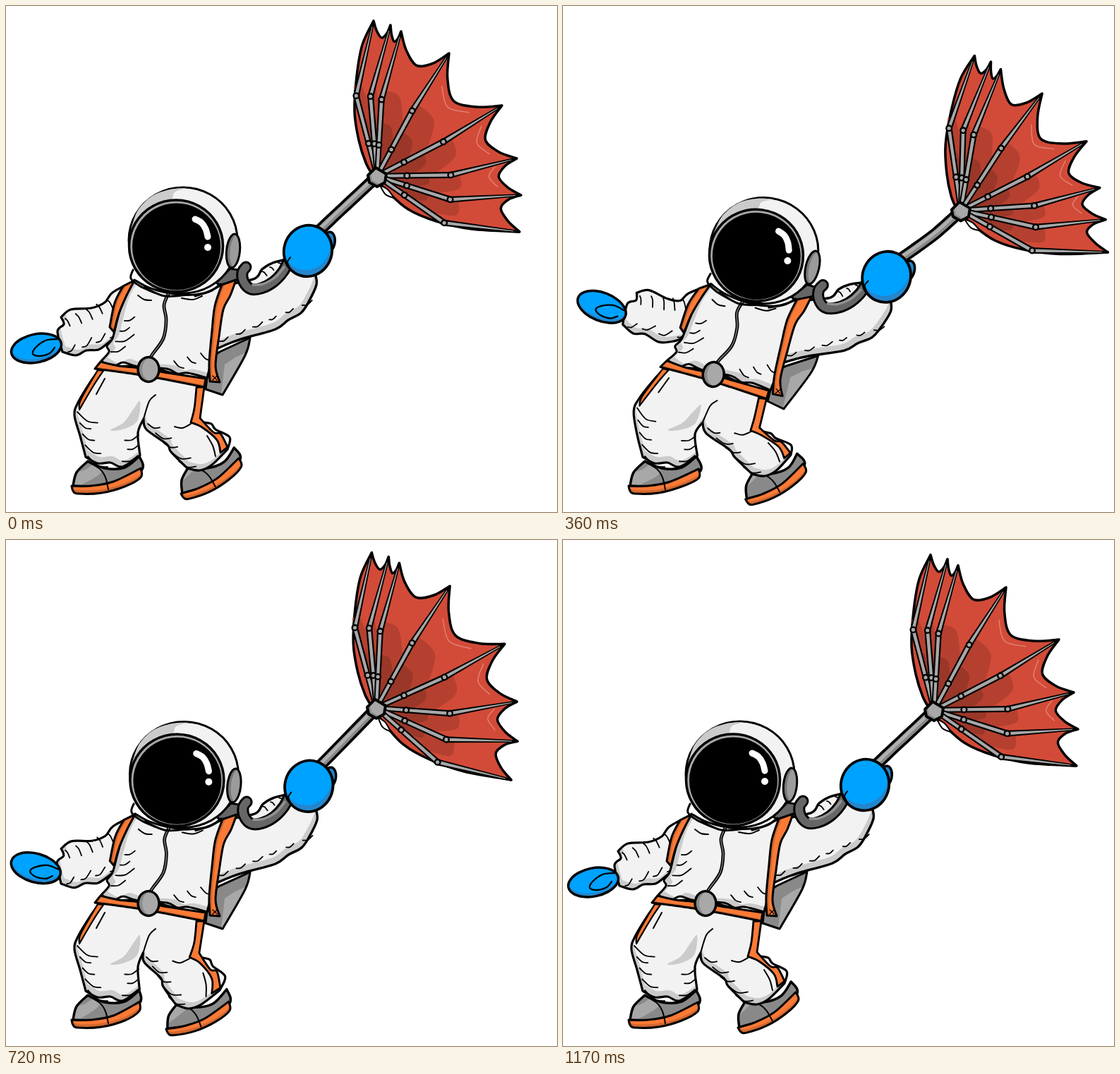
Write an HTML page with a canvas that moves like this. It is 781 by 717 pixels and loops after 1200 ms.

```html
<!DOCTYPE html>
<html lang="en">
<head>
<meta charset="utf-8">
<title>Astronaut with umbrella</title>
<style>
html, body { margin: 0; width: 781px; height: 717px; overflow: hidden; background: #fff; }
canvas { display: block; }
</style>
</head>
<body>
<canvas id="stage" width="781" height="717"></canvas>
<script>
const ctx = document.getElementById('stage').getContext('2d');
const WHITE = '#f2f2f2', PALE = '#cbcbcb', ORANGE = '#fb7a36', RUST = '#d2682f', BLUE = '#00a2ff', DEEP = '#2585cc';
const STEEL = '#a8a8a8', GREY = '#898989', DARK = '#666', RED = '#d24b38';
const HUB = [526, 241], HIP = [152, 607], WAIST = [202, 515], LEFT_FOOT = [143, 668];
const SHOULDER = [160, 432], WRIST = [78, 478], ANKLE = [290, 666];
const LOOP = 1170;
let pose;

const clamp = v => Math.min(1, Math.max(0, v));
const lerp = (a, b, t) => a + (b - a) * t;
const mix = (p, q, t) => [lerp(p[0], q[0], t), lerp(p[1], q[1], t)];
const add = (p, q, w = 1) => [p[0] + q[0] * w, p[1] + q[1] * w];
const ramp = (v, a, b) => { const t = clamp((v - a) / (b - a)); return t * t * (3 - 2 * t); };
const rise = (t, from, peak, to) => ramp(t, from, peak) * (1 - ramp(t, peak, to));
const random = i => { const v = Math.sin(i * 12.9898) * 43758.5453; return v - Math.floor(v); };
const turn = ([x, y], [cx, cy], a) => {
  const c = Math.cos(a), s = Math.sin(a);
  return [cx + (x - cx) * c - (y - cy) * s, cy + (x - cx) * s + (y - cy) * c];
};

// One gust: the figure is dragged along, staggers back and settles.
function poseAt(t) {
  const gust = rise(t, 0, 400, 600), pull = rise(t, 0, 400, 720), recoil = rise(t, 600, 900, LOOP);
  const settle = 1 - ramp(t, 850, LOOP), hold = ramp(t, 0, 360) * settle, stagger = ramp(t, 450, 690) * settle;
  return {
    lean: .13 * gust,
    bend: .05 * rise(t, 430, 600, 760),
    arm: .34 * rise(t, 0, 400, 800),
    wrist: .12 * hold + .32 * stagger,
    foot: [11 * gust - 18 * stagger, 8 * hold],
    footTurn: .14 * stagger,
    hub: [39 * pull - 3 * recoil, 50 * pull - 9 * recoil],
    upper: .157 * rise(t, 0, 560, 760) - .105 * rise(t, 640, 900, LOOP),
    lower: .122 * rise(t, 560, 740, LOOP) - .096 * rise(t, 0, 380, 620)
  };
}

// Each part is described at rest and bent into the current pose.
const torso = p => turn(turn(p, WAIST, pose.bend * ramp(p[1], 520, 400)), HIP, pose.lean * ramp(p[1], 640, 560));
const sleeve = p => torso(turn(p, SHOULDER, pose.arm * ramp(p[0], 165, 110)));
const mitten = p => torso(turn(turn(p, WRIST, pose.wrist), SHOULDER, pose.arm));
const legs = p => {
  const moved = add(add(turn(p, ANKLE, pose.footTurn), pose.foot), p, -1);
  return add(torso(p), moved, ramp(p[1], 560, 650) * ramp(p[0], 188, 202));
};
const rightFoot = p => legs(mix(ANKLE, add(turn(p, LEFT_FOOT, -.3), add(ANKLE, LEFT_FOOT, -1)), .95));
const hub = p => add(p, pose.hub);
const shaft = p => mix(torso(p), hub(p), ramp(p[0], 425, 540));
const canopy = p => {
  const angle = Math.atan2(p[1] - HUB[1], p[0] - HUB[0]);
  return hub(turn(p, HUB, lerp(pose.upper, pose.lower, clamp((angle + 1.31) / 1.66))));
};

// "x,y" points joined by a smooth curve; "!" marks a corner
const points = s => Array.isArray(s) ? s : s.trim().split(/\s+/).flatMap(w => {
  const p = w.replace('!', '').split(',').map(Number);
  return w.endsWith('!') ? [p, p] : [p];
});
const ring = (cx, cy, rx, ry, tilt = 0) => Array.from({ length: 12 }, (_, i) => {
  const a = i * Math.PI / 6;
  return turn([cx + rx * Math.cos(a), cy + ry * Math.sin(a)], [cx, cy], tilt);
});

function trace(shape, warp, closed) {
  const q = points(shape).map(warp), n = q.length;
  const at = i => closed ? q[(i + n) % n] : q[Math.min(n - 1, Math.max(0, i))];
  ctx.beginPath();
  ctx.moveTo(...q[0]);
  for (let i = 0; i < (closed ? n : n - 1); i++) {
    const [a, b, c, d] = [at(i - 1), at(i), at(i + 1), at(i + 2)];
    if (b[0] === c[0] && b[1] === c[1]) continue;
    ctx.bezierCurveTo(b[0] + (c[0] - a[0]) / 6, b[1] + (c[1] - a[1]) / 6,
      c[0] - (d[0] - b[0]) / 6, c[1] - (d[1] - b[1]) / 6, c[0], c[1]);
  }
  if (closed) ctx.closePath();
}

function stroke(color, width) {
  ctx.strokeStyle = color;
  ctx.lineWidth = width;
  ctx.stroke();
}

// The shade is what the same shape, moved towards the light, leaves uncovered.
function part(warp, shape, fill, width = 3, shade, light) {
  trace(shape, warp, true);
  ctx.fillStyle = shade || fill;
  ctx.fill();
  if (shade) {
    ctx.save();
    ctx.clip();
    ctx.translate(...light);
    trace(shape, warp, true);
    ctx.fillStyle = fill;
    ctx.fill();
    ctx.restore();
    trace(shape, warp, true);
  }
  if (width) stroke('#000', width);
}

function lines(warp, list, width = 2, color = '#000') {
  for (const s of Array.isArray(list) ? [list] : list.split(';')) {
    trace(s, warp, false);
    stroke(color, width);
  }
}

function tube(warp, s, outer, inner, color) {
  lines(warp, s, outer);
  lines(warp, s, inner, color);
}

// Creases in the cloth: curved strokes of varied length, spread between two points
function folds(warp, from, to, count, reach, sag) {
  for (let i = 0; i < count; i++) {
    const start = mix(from, to, i / (count - 1)), size = .55 + .6 * random(i + from[0]);
    const end = add(start, reach, size), middle = add(mix(start, end, .5), [0, sag * size]);
    lines(warp, [start, middle, end], 1.8);
  }
}

function taper(a, b, wa, wb, color) {
  const len = Math.hypot(b[0] - a[0], b[1] - a[1]);
  const n = [(a[1] - b[1]) / len / 2, (b[0] - a[0]) / len / 2];
  ctx.beginPath();
  for (const p of [add(a, n, wa), add(b, n, wb), add(b, n, -wb), add(a, n, -wa)]) ctx.lineTo(...p);
  ctx.fillStyle = color;
  ctx.fill();
}

function dot(p, r, color) {
  ctx.beginPath();
  ctx.arc(...p, r, 0, 7);
  ctx.fillStyle = color;
  ctx.fill();
}

const TIPS = points('521,21 545,27 560,36 628,67 703,141 724,216 730,268 728,320');
// ribs bow outwards more the further they are from the middle
const JOINTS = TIPS.map((tip, i) => {
  const [x, y] = add(tip, HUB, -1), bow = lerp(-27, 27, i / 7) / Math.hypot(x, y);
  return add(mix(HUB, tip, .52), [-y * bow, x * bow]);
});
// hem between two ribs, hanging towards the hub
const hem = (a, b) => {
  const depth = 14 + .28 * Math.hypot(b[0] - a[0], b[1] - a[1]);
  return [[.18, .62], [.5, 1], [.82, .62]].map(([along, deep]) => {
    const p = mix(a, b, along);
    return mix(p, HUB, depth * deep / Math.hypot(p[0] - HUB[0], p[1] - HUB[1]));
  });
};
const HEMS = TIPS.slice(1).map((tip, i) => hem(TIPS[i], tip));

function drawRib(tipAtRest, i) {
  const root = canopy(mix(HUB, JOINTS[i], .1)), joint = canopy(JOINTS[i]), tip = canopy(tipAtRest);
  const knob = mix(root, joint, .34);
  taper(joint, tip, 9, 3.5, '#000');
  taper(root, joint, 8, 9, '#000');
  taper(joint, mix(joint, tip, .92), 4.5, 1, STEEL);
  taper(root, joint, 4, 4.5, STEEL);
  for (const p of [knob, joint]) {
    dot(p, 5, '#000');
    dot(p, 2.6, STEEL);
  }
}

function drawUmbrella() {
  const top = TIPS[0], bottom = TIPS[7];
  const edge = [...points('540,262 570,288 610,305 660,316'), bottom, bottom];
  for (let i = 6; i >= 0; i--) edge.push(...HEMS[i].slice().reverse(), TIPS[i], TIPS[i]);
  edge.push(...points('505,55 497,100 494,150 500,190 510,222 520,240!'));
  part(canopy, edge, RED, 3.5);
  for (const [color, size] of [['#b54030', 1], ['#9a3729', .62]]) {
    for (let i = 0; i < 7; i++) {
      const reach = [JOINTS[i], mix(JOINTS[i], JOINTS[i + 1], .5), mix(HUB, JOINTS[i + 1], .75)];
      const lobe = reach.map((p, j) => mix(HUB, p, size * (j < 2 ? 1.12 : 1)));
      part(canopy, [HUB, HUB, lobe[0], lobe[0], lobe[1], lobe[2], lobe[2]], color, 0);
    }
  }
  HEMS.filter((_, i) => i > 2 && i % 2 || i === 4).forEach(h => lines(canopy, h.map(p => mix(HUB, p, .92)), 1.4, '#e58275'));
  part(canopy, '530,254! 541,260 550,272! 538,267', '#fff', 2);
  TIPS.forEach(drawRib);
}

function drawShaft() {
  tube(shaft, '432,330 460,303 490,275 520,247', 17, 9.5, GREY);
  lines(shaft, '432,328 460,301 490,273 520,245', 4.5, '#b0b0b0');
  part(hub, '513,240! 524,229! 539,238! 537,250! 526,256! 515,250!', STEEL, 4, GREY, [4, -3]);
}

function drawPack() {
  part(torso, '303,490! 346,470! 339,495 307,551! 283,543! 288,500!', STEEL, 3, GREY, [22, 8]);
  part(torso, '298,392! 318,372! 340,376! 338,396! 314,404!', DARK);
}

function drawShoe(warp) {
  part(warp, '95,680! 100,661 116,645! 140,655 168,654 189,638! 192,658 150,682!', STEEL, 3.5, GREY, [-58, 4]);
  part(warp, '93,680! 120,680 152,674 191,655! 191,668 168,681 135,690 102,691 95,687', ORANGE, 3, RUST, [0, -5]);
  lines(warp, '116,646 133,656 141,668 145,685');
}

function drawLegs() {
  drawShoe(legs);
  drawShoe(rightFoot);
  part(legs, `134,513! 120,532 102,562 97,580 105,609 113,639! 130,648 148,647 165,653
    190,637! 187,605 195,585! 199,600 228,621 234,632 257,655! 275,658 292,650 314,628!
    317,611 297,600 291,592 277,588 272,572 281,538! 235,520 190,510`, WHITE, 3.2, PALE, [3, -9]);
  part(legs, '148,601 167,590 180,572 190,560 186,588 165,600', PALE, 0);
  part(legs, '270,540! 281,540! 275,584! 294,604 304,606 314,625! 304,633! 299,615 278,597 262,590! 267,570', ORANGE, 2.8);
  part(legs, '130,516! 138,517! 124,538 104,572! 106,558', ORANGE, 2.2);
  lines(legs, '212,551 203,560 195,585;140,528 128,550;262,592 250,598 239,596;285,609 293,623 297,638');
  folds(legs, [101, 575], [116, 638], 5, [26, 14], 5);
  folds(legs, [188, 608], [187, 637], 3, [-24, 9], 4);
  folds(legs, [201, 592], [245, 645], 5, [26, 8], 5);
}

function drawLeftArm() {
  part(sleeve, `182,389! 151,406 140,420 121,428 92,430 78,441! 82,451 73,461 80,490!
    99,495 114,488 131,487 145,477 157,467! 170,430`, WHITE, 3.2, PALE, [4, -8]);
  folds(sleeve, [84, 443], [143, 416], 5, [11, 17], -3);
  folds(sleeve, [88, 490], [148, 470], 4, [12, -12], 4);
  part(mitten, ring(43, 485, 36, 20, -.2), BLUE, 3.5, DEEP, [0, -5]);
  lines(mitten, '72,472 56,474 42,484 38,493 48,496 62,492 69,484', 2.3);
}

function drawTorso() {
  part(torso, `182,388! 205,400 245,409 280,407 308,394! 324,391! 311,430 292,500 285,527! 258,520 243,521
    228,514 187,511 166,505 151,511 135,503! 146,490 143,482 151,471 158,444 166,417`, WHITE, 3, PALE, [9, -5]);
  tube(torso, '230,408 224,424 227,445 223,471 208,493 201,504', 4.8, 1.6, '#777');
  folds(torso, [149, 490], [168, 446], 4, [24, -9], 4);
  folds(torso, [238, 503], [276, 492], 3, [15, 11], 3);
  lines(torso, '187,410 196,416 206,417;278,411 265,416 249,414');
  part(torso, '134,504! 160,510 190,513 230,520 283,528! 281,540! 230,530 185,522 126,514!', ORANGE, 3, RUST, [0, -3]);
  part(torso, ring(202, 515, 15, 17.5), STEEL, 3.5, GREY, [6, 0]);
  part(torso, '182,389! 166,397! 154,421 147,455! 153,462! 160,436 171,410', ORANGE, 3, RUST, [4, 0]);
}

function drawRightArm() {
  part(torso, `319,394! 353,386 363,373 378,364 397,359! 418,378 438,379! 440,395 428,421 418,435 400,445
    382,458 340,470 319,477 298,486! 301,450 308,417`, WHITE, 3.4, PALE, [-4, -9]);
  folds(torso, [303, 475], [420, 424], 6, [14, -7], 3);
  folds(torso, [362, 376], [386, 364], 3, [9, 7], -2);
  part(torso, '306,395! 326,388! 318,410 308,430 302,468 297,510 303,533! 289,532! 288,505 292,460 296,425', ORANGE, 3, RUST, [4, 0]);
  lines(torso, '293,524! 299,530!;299,524! 293,530!', 1.3);
}

function drawHelmet() {
  lines(torso, '180,374 177,386 190,397 210,406;196,399 225,411 258,409;268,411 290,404 304,394', 3);
  part(torso, ring(251, 332, 77, 75), WHITE, 3);
  part(torso, '177,318! 186,291 206,270 232,260 256,258! 239,264 232,277 196,296!', PALE, 0);
  part(torso, ring(241, 340, 66.5, 65), STEEL, 3.5);
  part(torso, ring(241.5, 341, 61.5, 60.5), '#000', 2);
  lines(torso, '268,302 277,307 283,316 286,327', 9, '#fff');
  part(torso, ring(286, 342, 5, 5), '#fff', 0);
  part(torso, ring(322, 347, 9.5, 24, .1), '#9b9b9b', 3, '#777', [5, 0]);
}

function drawGrip() {
  tube(torso, '402,358 393,376 379,391 362,400 347,401 337,391 335,378 340,370', 17, 11, DARK);
  lines(torso, '394,370 382,384 364,394 350,395', 3.5, '#929292');
  part(torso, ring(457, 335, 9, 15, .2), DEEP, 3.5);
  part(torso, ring(428, 347, 34, 36.5, .3), BLUE, 3.8, DEEP, [-2, -9]);
  lines(torso, '403,372 399,363 403,356');
}

function render(now) {
  // a new drawing every 30 ms, the last one of a loop repeating the first
  pose = poseAt(Math.floor(now / 30) * 30 % 1200 % LOOP);
  ctx.fillStyle = '#fff';
  ctx.fillRect(0, 0, 781, 717);
  drawPack();
  drawLegs();
  drawLeftArm();
  drawTorso();
  drawRightArm();
  drawHelmet();
  drawUmbrella();
  drawShaft();
  drawGrip();
}

ctx.lineCap = ctx.lineJoin = 'round';
const start = performance.now();
function loop() {
  render(performance.now() - start);
  requestAnimationFrame(loop);
}
loop();
</script>
</body>
</html>
```
